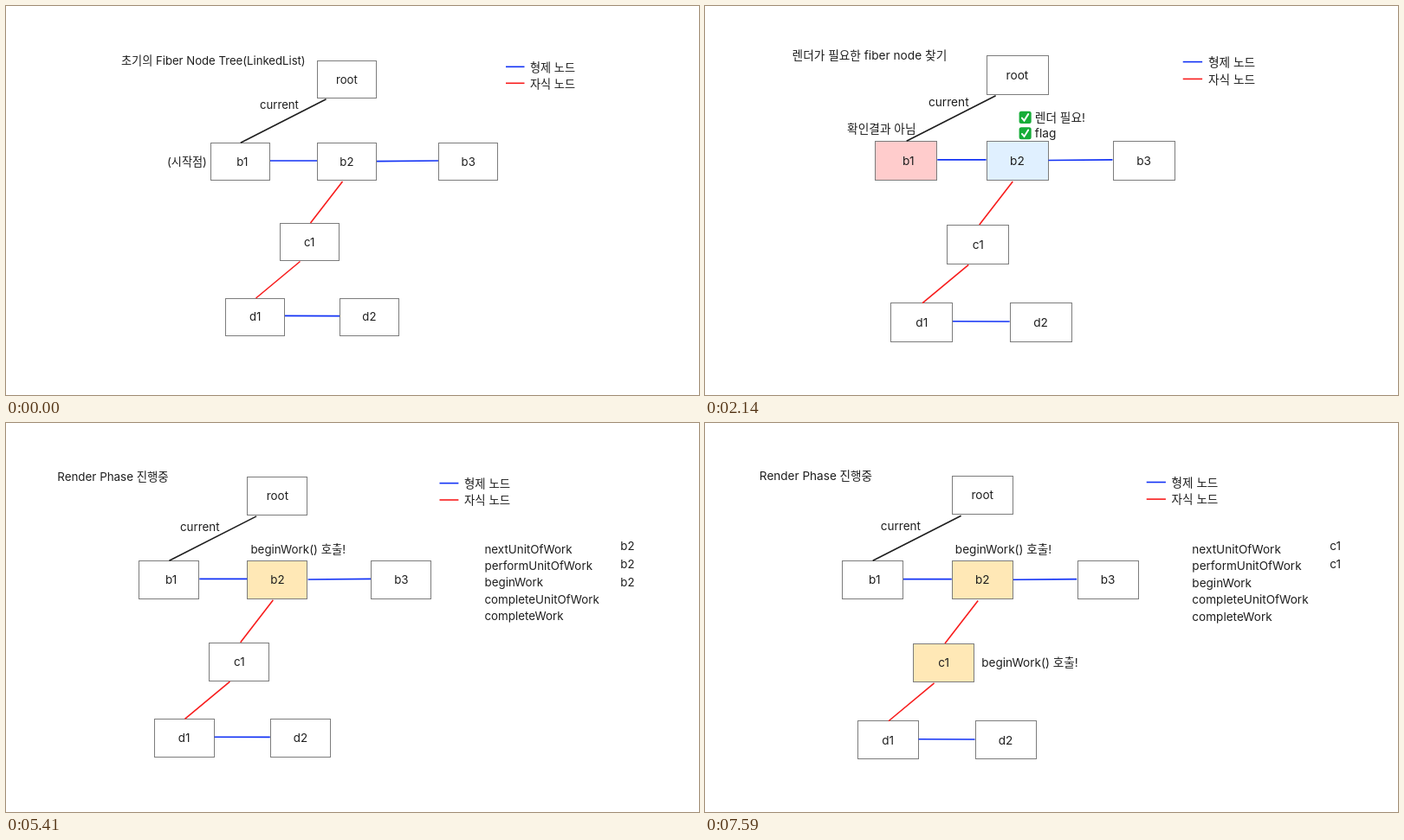
Animation of 800x450 px, one loop 8 s. Source, as an HTML page with a canvas:

```html
<!DOCTYPE html>
<html lang="ko">
<head>
<meta charset="utf-8">
<title>Node tree walk</title>
<style>
  html, body { margin: 0; width: 100%; height: 100%; overflow: hidden; background: #fff; }
  canvas { display: block; width: 800px; height: 450px; }
</style>
</head>
<body>
<canvas id="stage" width="800" height="450"></canvas>
<script>
const ctx = document.getElementById('stage').getContext('2d');
const LOOP = 8000;
const INK = '#1e1e1e', BLUE = '#1232f5', RED = '#f81c1c';
const PINK = '#ffcccc', SKY = '#e0f0ff', AMBER = '#ffe8b6';
const FONT = 'Inter, "Noto Sans CJK KR", "Noto Sans CJK", sans-serif';
const STEPS = ['nextUnitOfWork', 'performUnitOfWork', 'beginWork', 'completeUnitOfWork', 'completeWork'];

// Diagram units; the origin is the top left corner of b1.
const BOX = { w: 68.8, h: 43.8 };
const NODES = {
  root: [123, -95], b1: [0, 0], b2: [123, 0], b3: [263.3, 0],
  c1: [79.7, 93], d1: [17.3, 179.7], d2: [149, 179.7]
};
const EDGES = [
  [INK, 34.8, 0.2, 133.6, -50.2],
  [BLUE, 69, 21, 123, 21],
  [BLUE, 192, 21.6, 263, 21],
  [RED, 152.5, 45, 115.5, 93],
  [RED, 103.5, 137.5, 52.5, 180],
  [BLUE, 86, 200.4, 149, 200.6]
];

const SEARCH = '렌더가 필요한 fiber node 찾기';
const RENDER = 'Render Phase 진행중';
const CALL = 'beginWork() 호출!';
const notB1 = ['확인결과 아님', -31, -13.2];
const callB2 = [CALL, 127, -12.8];
const callC1 = [CALL, 156.5, 114.7];

// at: start in ms; x, y: place of b1; s: scale; cur: place of the "current" label
const SLIDES = [
  { at: 0, x: 236, y: 158, s: 1, title: '초기의 Fiber Node Tree(LinkedList)', titleX: -103,
    cur: [57, -44], notes: [['(시작점)', -50, 22]] },
  { at: 1050, x: 176, y: 160, s: 0.99, title: SEARCH, legendX: 455,
    cur: [59, -43.5], fill: { b1: PINK }, notes: [notB1] },
  { at: 2140, x: 196.4, y: 156, s: 1.042, title: SEARCH,
    cur: [59, -43], fill: { b1: PINK, b2: SKY },
    notes: [notB1, ['렌더 필요!', 177, -26], ['flag', 177, -8.4]],
    checks: [[159.5, -26], [159.5, -8.4]] },
  { at: 3230, x: 159.4, y: 158, s: 1.026, title: RENDER,
    cur: [47.5, -38], fill: { b2: AMBER }, notes: [callB2], values: ['b2'] },
  { at: 4320, x: 155, y: 159.5, s: 1.01, title: RENDER,
    cur: [47.5, -38], fill: { b2: AMBER }, notes: [callB2], values: ['b2', 'b2'] },
  { at: 5410, x: 153, y: 159, s: 1.019, title: RENDER,
    cur: [47, -38], fill: { b2: AMBER }, notes: [callB2], values: ['b2', 'b2', 'b2'] },
  { at: 6500, x: 162, y: 164, s: 1, title: RENDER,
    cur: [43, -38], fill: { b2: AMBER, c1: AMBER }, notes: [callB2, callC1], values: ['c1'] },
  { at: 7590, x: 157.8, y: 159, s: 1.032, title: RENDER,
    cur: [43.5, -38.2], fill: { b2: AMBER, c1: AMBER }, notes: [callB2, callC1], values: ['c1', 'c1'] }
];

function draw(slide) {
  const { s, fill = {}, checks = [], values } = slide;
  const px = x => slide.x + x * s;
  const py = y => slide.y + y * s;

  function text(str, x, y, align = 'left') {
    ctx.font = `400 ${13.15 * s}px ${FONT}`;
    ctx.textAlign = align;
    ctx.fillStyle = INK;
    ctx.fillText(str, px(x), py(y + 4.7));
  }

  function line(color, x1, y1, x2, y2) {
    ctx.strokeStyle = color;
    ctx.lineWidth = 1.6;
    ctx.beginPath();
    ctx.moveTo(px(x1), py(y1));
    ctx.lineTo(px(x2), py(y2));
    ctx.stroke();
  }

  function node(name, [x, y]) {
    const left = Math.round(px(x)) + 0.5, top = Math.round(py(y)) + 0.5;
    const w = Math.round(BOX.w * s) - 1, h = Math.round(BOX.h * s) - 1;
    ctx.fillStyle = fill[name] || '#fff';
    ctx.fillRect(left, top, w, h);
    ctx.strokeStyle = '#7c7c7c';
    ctx.lineWidth = 1;
    ctx.strokeRect(left, top, w, h);
    const shift = name === 'b1' ? 2.4 : 0;
    text(name, x + BOX.w / 2 + shift, y + BOX.h / 2, 'center');
  }

  function check([x, y]) {
    const size = 13.5 * s;
    ctx.save();
    ctx.translate(px(x), py(y) - size / 2);
    ctx.fillStyle = '#16ad38';
    ctx.beginPath();
    ctx.roundRect(0, 0, size, size, 2.5);
    ctx.fill();
    ctx.strokeStyle = '#fff';
    ctx.lineWidth = 2;
    ctx.lineCap = 'round';
    ctx.beginPath();
    ctx.moveTo(size * 0.24, size * 0.55);
    ctx.lineTo(size * 0.42, size * 0.76);
    ctx.lineTo(size * 0.75, size * 0.23);
    ctx.stroke();
    ctx.restore();
  }

  ctx.fillStyle = '#fff';
  ctx.fillRect(0, 0, 800, 450);

  for (const [name, pos] of Object.entries(NODES)) node(name, pos);
  for (const edge of EDGES) line(...edge);

  text(slide.title, slide.titleX ?? -92, -94.8);
  text('current', ...slide.cur);
  for (const note of slide.notes) text(...note);
  checks.forEach(check);

  const lx = slide.legendX ?? 341;
  [['형제 노드', BLUE], ['자식 노드', RED]].forEach(([label, color], i) => {
    const y = -87.7 + i * 19;
    line(color, lx, y, lx + 21.5, y);
    text(label, lx + 28, y + 0.5);
  });

  if (values) {
    STEPS.forEach((step, i) => text(step, 392, -12.7 + i * 18.9));
    values.forEach((value, i) => text(value, 546, -16 + i * 20.5));
  }
}

const start = performance.now();
function tick() {
  const t = (performance.now() - start) % LOOP;
  draw(SLIDES.findLast(slide => slide.at <= t));
  requestAnimationFrame(tick);
}
tick();
</script>
</body>
</html>
```
